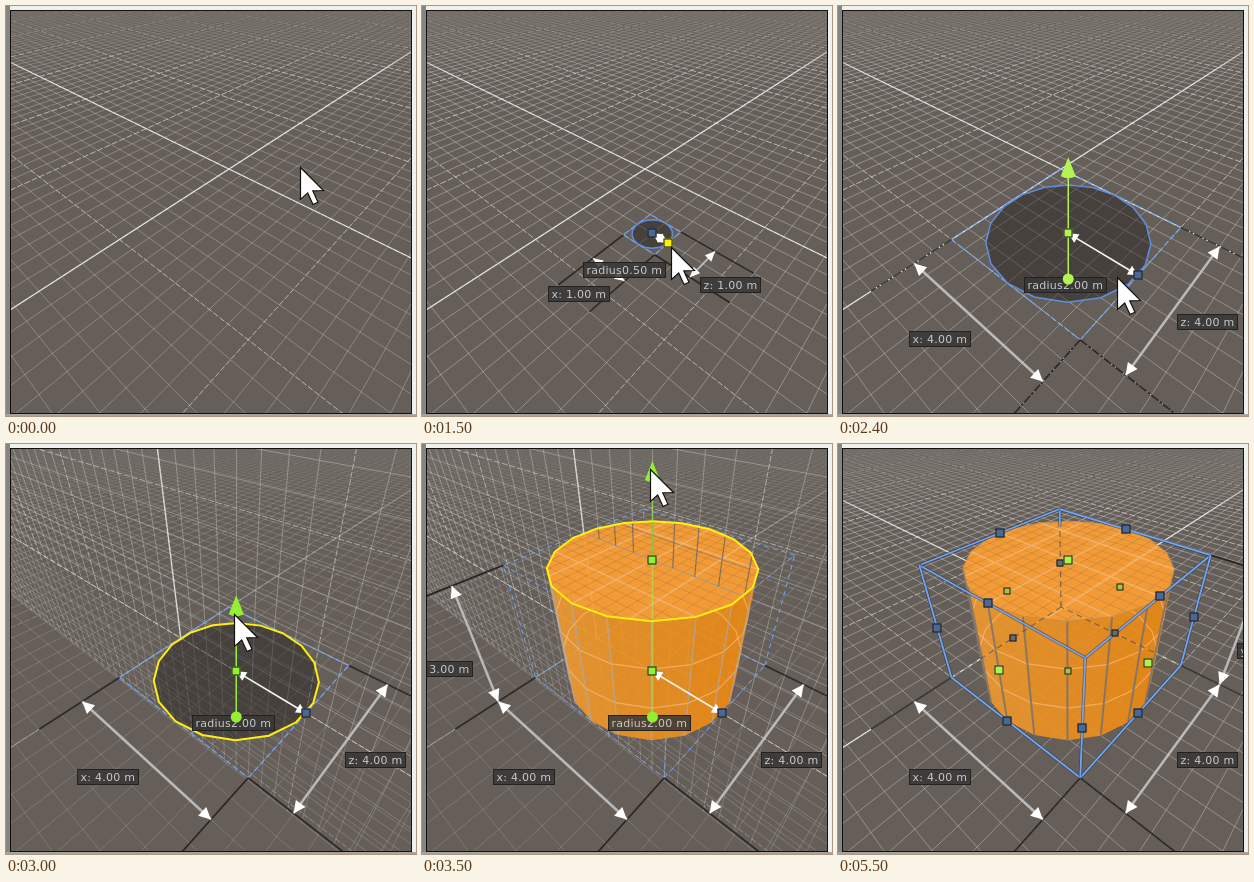
Write an HTML page with a canvas that moves like this. It is 410 px wide and 410 px high and loops after 5.6 s.

```html
<!DOCTYPE html>
<html lang="en">
<head>
<meta charset="utf-8">
<title>Cylinder tool</title>
<style>
  html, body { margin: 0; width: 100%; height: 100%; overflow: hidden; background: #665f59; }
  canvas { display: block; width: 410px; height: 410px; }
</style>
</head>
<body>
<canvas id="stage"></canvas>
<script>
const LOOP = 5600, SIZE = 410, SEGMENTS = 18;
const canvas = document.getElementById('stage');
const c = canvas.getContext('2d');
const scale = window.devicePixelRatio || 1;
canvas.width = canvas.height = SIZE * scale;

const BLUE = '#72a6f4', STEEL = '#4c6892', GREEN = '#92f032', LIME = '#aef04e', YELLOW = '#ffee10';
const DARK = 'rgba(26,23,21,.85)';

// time, cursor x, cursor y
const CURSOR = [
  [0, 294, 161], [100, 215, 254], [200, 215, 254], [500, 238, 210], [600, 238, 210],
  [1100, 230, 228], [1400, 230, 228], [1500, 249, 241], [1700, 264, 250], [1800, 264, 250],
  [2100, 301, 270], [2300, 301, 270], [2400, 279, 271], [2800, 228, 170], [3000, 228, 170],
  [3500, 228, 25], [4700, 228, 25], [5100, 345, 66], [5600, 345, 66]
];
// time, value in metres
const RADIUS = [[0, 0], [1500, .5], [1600, 1], [1900, 1.5], [2100, 2]];
const HEIGHT = [[0, 0], [3100, .5], [3200, 1], [3300, 2], [3400, 2.5], [3500, 3]];

const stepAt = (table, t) => table.filter(row => row[0] <= t).pop()[1];

function tween(table, t) {
  const i = Math.max(1, table.findIndex(row => row[0] >= t));
  const a = table[i - 1], b = table[i], k = (t - a[0]) / (b[0] - a[0]);
  return [a[1] + (b[1] - a[1]) * k, a[2] + (b[2] - a[2]) * k];
}

// Vanishing points of a three-point perspective: x, y and strength.
// u and v span 4 m on the ground, h spans 3 m upwards.
const ORIGIN = [223, 163];
const VANISH = [[628.6, -98, -.2126], [-311.8, -98, -.183], [229.6, 639, -.1707]];

function homog([u, v, h = 0]) {
  const out = [...ORIGIN, 1];
  [u, v, h].forEach((n, i) => {
    const [x, y, k] = VANISH[i];
    out[0] += n * k * x;
    out[1] += n * k * y;
    out[2] += n * k;
  });
  return out;
}
const flat = p => [p[0] / p[2], p[1] / p[2]];
const project = p => flat(homog(p));
const middle = (p, q) => p.map((n, i) => (n + q[i]) / 2);

function addSegment(p, q) {
  const near = .15;
  let a = homog(p), b = homog(q);
  if (a[2] < near && b[2] < near) return;
  const cut = (from, to) => {
    const k = (near - from[2]) / (to[2] - from[2]);
    return from.map((n, i) => n + (to[i] - n) * k);
  };
  if (a[2] < near) a = cut(a, b);
  else if (b[2] < near) b = cut(b, a);
  c.moveTo(...flat(a));
  c.lineTo(...flat(b));
}

function stroke(color, width, dash, build) {
  c.strokeStyle = color;
  c.lineWidth = width;
  c.setLineDash(dash);
  c.beginPath();
  build();
  c.stroke();
  c.setLineDash([]);
}

const edge = (p, q, color, width, dash = []) => stroke(color, width, dash, () => addSegment(p, q));
const white = alpha => `rgba(235,235,232,${alpha})`;

function groundLines(step, skip) {
  for (let i = Math.round(-10 / step); i * step <= 2.6; i++) {
    if (skip && i % skip === 0) continue;
    const k = i * step;
    addSegment([k, -10], [k, 2.6]);
    addSegment([-10, k], [2.6, k]);
  }
}

function ground(minor, major, axis) {
  stroke(white(minor), 1, [], () => groundLines(.125, 8));
  stroke(white(major), 1, [6, 2], () => groundLines(1));
  stroke(white(axis), 1.2, [], () => {
    addSegment([0, -10], [0, 2.6]);
    addSegment([-10, 0], [2.6, 0]);
  });
}

function wall() {
  const run = (alpha, from, to) => {
    for (const major of [false, true]) {
      stroke(white(alpha * (major ? 1.7 : 1)), 1, major ? [6, 2] : [], () => {
        for (let i = -64; i <= 16; i++) {
          if ((i % 8 === 0) === major) addSegment([.5, i / 8, from], [.5, i / 8, to]);
        }
        for (let i = Math.round(from * 6); i <= to * 6; i++) {
          if ((i % 8 === 0) === major) addSegment([.5, -8, i / 6], [.5, 2, i / 6]);
        }
      });
    }
  };
  run(.31, 0, 3);
  run(.2, -1.5, 0);
  edge([.5, 0, 0], [.5, 0, 3], white(.75), 1.4);
}

function polygon(points) {
  const path = new Path2D();
  points.forEach((p, i) => i ? path.lineTo(...p) : path.moveTo(...p));
  path.closePath();
  return path;
}

const rim = (radius, h) => Array.from({ length: SEGMENTS }, (_, i) => {
  const a = i * 2 * Math.PI / SEGMENTS;
  return project([.5 + radius * Math.cos(a), .5 + radius * Math.sin(a), h]);
});

function outline(path, color, width) {
  c.strokeStyle = color;
  c.lineWidth = width;
  c.stroke(path);
}

function inside(path, paint) {
  c.save();
  c.clip(path);
  paint();
  c.restore();
}

function topLines(count, h) {
  for (let i = 0; i <= count; i++) {
    addSegment([i / count, 0, h], [i / count, 1, h]);
    addSegment([0, i / count, h], [1, i / count, h]);
  }
}

function cylinder(h, done) {
  const low = rim(.5, 0), high = rim(.5, h), side = new Path2D(), seams = new Path2D();
  low.forEach((p, i) => {
    const j = (i + 1) % SEGMENTS, q = low[j], r = high[j], s = high[i];
    const facing = (q[0] - p[0]) * (s[1] - p[1]) - (q[1] - p[1]) * (s[0] - p[0]);
    if (facing > 0) return;
    const face = polygon([p, q, r, s]);
    const light = 53 - 4 * Math.sin((i + .5) * 2 * Math.PI / SEGMENTS - .7);
    c.fillStyle = `hsla(33,86%,${light}%,.9)`;
    c.fill(face);
    side.addPath(face);
    seams.addPath(polygon([p, s]));
  });
  const top = polygon(high);
  c.fillStyle = 'rgba(253,160,52,.92)';
  c.fill(top);

  inside(side, () => {
    for (let m = 1; m < h * 3; m++) outline(polygon(rim(.5, m / 3)), 'rgba(255,205,155,.5)', 1.2);
  });
  inside(top, () => {
    stroke('rgba(140,95,60,.25)', 1, [], () => topLines(16, h));
    stroke('rgba(255,210,165,.6)', 1.2, [], () => topLines(4, h));
  });

  outline(seams, done ? 'rgba(125,115,110,.85)' : 'rgba(180,172,172,.7)', done ? 2 : 1.4);
  if (done) {
    outline(top, 'rgba(205,145,75,.9)', 1);
    return;
  }
  // The upright grid stands in front of the rear half of the lid.
  inside(top, () => {
    stroke('rgba(95,95,105,.75)', 1.2, [], () => {
      for (let i = 0; i <= 8; i++) addSegment([.5, i / 8, h], [.5, i / 8, h + 1]);
    });
    stroke('rgba(95,95,105,.5)', 1, [], () => {
      for (let i = 0; i <= 3; i++) addSegment([.5, 0, h + i / 6], [.5, 1, h + i / 6]);
    });
  });
  outline(top, YELLOW, 2);
}

function square(p, fill, size = 8) {
  const x = Math.round(p[0]) - size / 2, y = Math.round(p[1]) - size / 2;
  c.fillStyle = fill;
  c.fillRect(x, y, size, size);
  c.strokeStyle = '#16181c';
  c.lineWidth = 1;
  c.strokeRect(x + .5, y + .5, size - 1, size - 1);
}

function arrowHead(tip, from, length, half) {
  const a = Math.atan2(tip[1] - from[1], tip[0] - from[0]);
  const at = (back, side) => [
    tip[0] - back * Math.cos(a) - side * Math.sin(a),
    tip[1] - back * Math.sin(a) + side * Math.cos(a)
  ];
  c.fillStyle = '#fff';
  c.fill(polygon([tip, at(length, half), at(length, -half)]));
}

function doubleArrow(a, b, color, width, length, half) {
  stroke(color, width, [], () => { c.moveTo(...a); c.lineTo(...b); });
  arrowHead(a, b, length, half);
  arrowHead(b, a, length, half);
}

function label(text, [x, y], dx, dy) {
  c.font = '11px "DejaVu Sans", sans-serif';
  if ('letterSpacing' in c) c.letterSpacing = '0.25px';
  const w = Math.round(c.measureText(text).width + 7);
  const left = Math.round(x + dx - w / 2 - .5), top = Math.round(y + dy - 8);
  c.fillStyle = 'rgba(56,55,54,.86)';
  c.fillRect(left, top, w, 16);
  c.strokeStyle = '#242220';
  c.lineWidth = 1;
  c.strokeRect(left + .5, top + .5, w - 1, 15);
  c.fillStyle = '#c9c9c9';
  c.fillText(text, left + 3.5, top + 12);
}

const metres = n => n.toFixed(2) + ' m';

function dimension(p, q, text, dx, dy) {
  const a = project(p), b = project(q);
  const small = Math.hypot(a[0] - b[0], a[1] - b[1]) < 60;
  doubleArrow(a, b, 'rgba(195,195,195,.9)', small ? 1.8 : 2.5, small ? 10 : 12, small ? 4.5 : 6);
  return () => label(text, project(middle(p, q)), dx, dy);
}

function dimensions(r, h, done, dash) {
  const lo = .5 - r, hi = .5 + r, labels = [];
  for (const side of [lo, hi]) {
    edge([hi, side, 0], [hi + .5, side, 0], DARK, 1.6, dash);
    edge([side, hi, 0], [side, hi + .5, 0], DARK, 1.6, dash);
  }
  labels.push(dimension([hi + .25, lo, 0], [hi + .25, hi, 0], 'x: ' + metres(r * 8), -29, 25));
  labels.push(dimension([lo, hi + .25, 0], [hi, hi + .25, 0], 'z: ' + metres(r * 8), 28, 21));
  if (h) {
    const at = (d, level) => done ? [lo, hi + d, level] : [hi + d, lo, level];
    edge(at(0, h), at(.5, h), DARK, 1.8);
    labels.push(dimension(at(.25, 0), at(.25, h), 'y: ' + metres(h * 3), done ? 29 : -35, done ? 16 : 18));
  }
  return labels;
}

function boxEdges(lo, hi, h) {
  const ring = level => [[lo, lo, level], [hi, lo, level], [hi, hi, level], [lo, hi, level]];
  const bottom = ring(0), top = ring(h);
  return bottom.flatMap((p, i) => [
    { a: p, b: bottom[(i + 1) % 4], hidden: i === 0 || i === 3 },
    { a: top[i], b: top[(i + 1) % 4] },
    { a: p, b: top[i], hidden: i === 0 }
  ]);
}

function selection() {
  const edges = boxEdges(0, 1, 1), mid = e => project(middle(e.a, e.b));
  const hidden = edges.filter(e => e.hidden), shown = edges.filter(e => !e.hidden);
  const solid = (a, b) => {
    edge(a, b, 'rgba(30,40,60,.55)', 3.2);
    edge(a, b, BLUE, 1.8);
  };
  for (const e of hidden) edge(e.a, e.b, 'rgba(60,60,70,.6)', 1.2, [6, 4]);
  solid([0, 0, .85], [0, 0, 1]);
  for (const e of shown) solid(e.a, e.b);
  for (const e of hidden) square(mid(e), '#6c6a66', 7);
  for (const p of [[.5, 0, .5], [0, .5, .5], [.5, .5, 0]]) square(project(p), '#b4bd45', 7);
  for (const e of shown) square(mid(e), STEEL, 9);
  for (const p of [[.5, .5, 1], [1, .5, .5], [.5, 1, .5]]) square(project(p), LIME, 9);
}

function heightHandle(h, hover) {
  const [x, y] = project([.5, .5, h]), tip = y - 75 - 23 * h;
  const foot = project([.5, .5, 0]);
  const color = hover ? GREEN : '#b2f455';
  const line = (from, to, tint) => stroke(tint, 1.5, [], () => { c.moveTo(x, from); c.lineTo(x, to); });
  line(tip + 16, y, h ? 'rgba(146,240,50,.65)' : color);
  line(y, 273, h ? 'rgba(170,235,90,.6)' : color);
  c.fillStyle = color;
  c.beginPath();
  c.moveTo(x, tip - 1);
  c.lineTo(x + 7.5, tip + 18);
  c.quadraticCurveTo(x, tip + 22, x - 7.5, tip + 18);
  c.fill();
  c.beginPath();
  c.arc(x, 273, 5.5, 0, 2 * Math.PI);
  c.fill();
  square(foot, color, 9);
  if (h) square([x, y], color, 9);
}

function editing(t, r, h) {
  const dragging = t < 2400, hover = t >= 2800;
  const lo = .5 - r, hi = .5 + r;
  if (h) for (const e of boxEdges(lo, hi, h)) edge(e.a, e.b, BLUE, 1, [5, 4]);
  else {
    const corners = [[lo, lo], [hi, lo], [hi, hi], [lo, hi]];
    corners.forEach((p, i) => edge(p, corners[(i + 1) % 4], BLUE, 1.2, [6, 3]));
  }
  const dash = r === .5 && t < 3000 ? [9, 1.5, 3, 1.5] : [];
  const labels = dimensions(r, h, false, dash);
  if (h) cylinder(h, false);
  else {
    const disc = polygon(rim(r, 0));
    c.fillStyle = 'rgba(25,22,20,.4)';
    c.fill(disc);
    outline(disc, hover ? YELLOW : '#5f8fdc', hover ? 2 : 1.5);
  }
  const center = project([.5, .5]), grip = project([.5, hi]);
  doubleArrow(center, grip, '#f4f4f4', 1.7, 10, 5);
  labels.push(() => label('radius' + metres(r * 4), project([.5, .5 + r / 2]), -35, 32));
  labels.forEach(show => show());
  if (dragging) square(center, STEEL, 9);
  else heightHandle(h, hover);
  square(grip, dragging ? '#fff000' : STEEL, 9);
}

function pointer(x, y) {
  c.save();
  c.translate(x + .5, y + .5);
  const arrow = polygon([[0, 0], [0, 32], [7.2, 25.5], [12.5, 37], [17.5, 34.8], [12.3, 23.4], [23, 23]]);
  c.fillStyle = '#fff';
  c.fill(arrow);
  outline(arrow, '#111', 1.2);
  c.restore();
}

function frame() {
  c.fillStyle = '#868584';
  c.fillRect(0, 0, 4, SIZE);
  c.fillStyle = '#f0f1ee';
  c.fillRect(4, 0, 406, 4);
  c.fillRect(406, 0, 4, SIZE);
  c.fillStyle = '#a5a4a2';
  c.fillRect(0, 408, SIZE, 2);
  c.strokeStyle = '#111';
  c.lineWidth = 1;
  c.strokeRect(4.5, 4.5, 401, 403);
}

function draw(now) {
  const t = Math.floor(now % LOOP / 100) * 100;
  const r = stepAt(RADIUS, t) / 4, h = stepAt(HEIGHT, t) / 3;
  const walled = t >= 3000 && t < 3800, done = t >= 4400;
  const active = Math.min(1, Math.max(0, (t - 200) / 300));

  c.setTransform(scale, 0, 0, scale, 0, 0);
  c.fillStyle = '#665f59';
  c.fillRect(0, 0, SIZE, SIZE);
  c.save();
  c.beginPath();
  c.rect(4, 4, 402, 404);
  c.clip();

  if (walled) ground(.17, .25, .25);
  else ground(.27 + .07 * active, .62, .85);
  const haze = c.createLinearGradient(0, 4, 0, 70);
  haze.addColorStop(0, 'rgba(108,102,96,.8)');
  haze.addColorStop(1, 'rgba(108,102,96,0)');
  c.fillStyle = haze;
  c.fillRect(4, 4, 402, 66);
  if (walled) wall();

  if (done) {
    const labels = dimensions(r, h, true, []);
    cylinder(h, true);
    selection();
    labels.forEach(show => show());
  } else if (r) editing(t, r, h);
  else if (t >= 1100) square(project([.5, .5]), STEEL, 9);

  if (t < 5500) pointer(...tween(CURSOR, t));
  c.restore();
  frame();
}

function tick() {
  draw(performance.now());
  requestAnimationFrame(tick);
}
tick();
</script>
</body>
</html>
```
